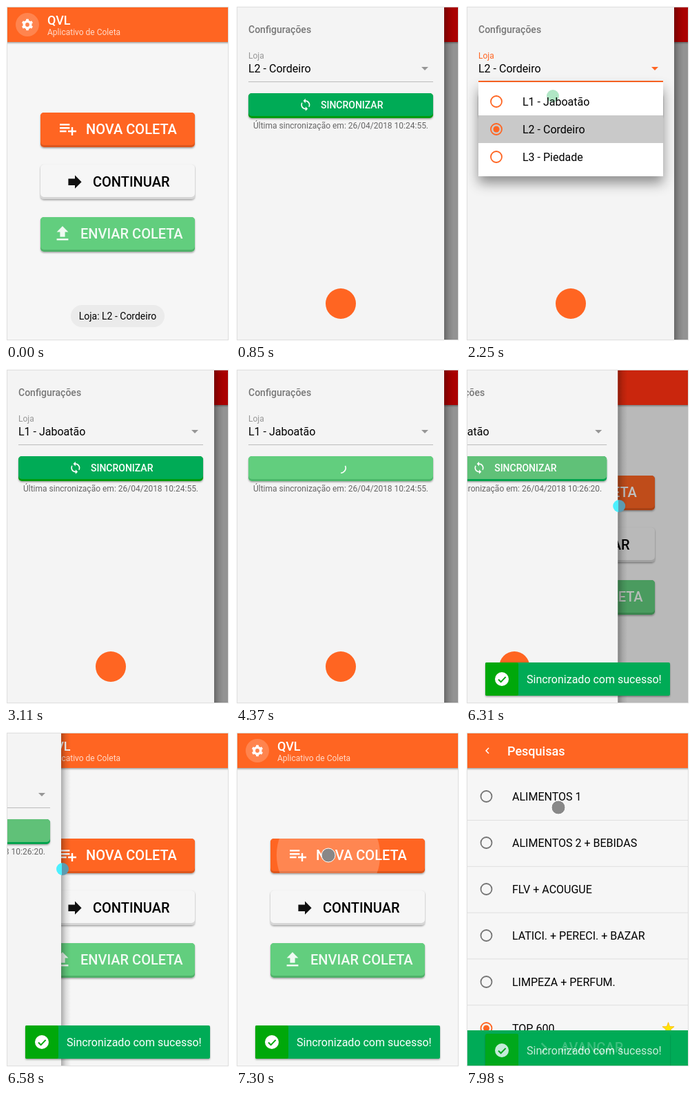
These frames come from a looping animation (325x484 px, 8000 ms). An HTML page:

```html
<!DOCTYPE html>
<html lang="pt">
<head>
<meta charset="utf-8">
<title>Aplicativo de Coleta</title>
<style>
html, body { margin: 0; width: 325px; height: 484px; overflow: hidden; background: #fff; }
svg { display: block; font-family: Roboto, sans-serif; }
.m { font-weight: 500; }
.s12 { font-size: 12px; }
.s14 { font-size: 14px; }
.s16 { font-size: 16px; }
.s20 { font-size: 20px; }
</style>
</head>
<body>
<svg id="stage" width="325" height="484" viewBox="0 0 325 484">
  <defs>
    <clipPath id="screen"><rect x="2" y="2" width="320" height="480"/></clipPath>
    <clipPath id="syncClip"><rect x="18" y="126" width="268" height="36" rx="5"/></clipPath>
    <clipPath id="newClip"><rect x="50" y="154" width="224" height="50" rx="5"/></clipPath>
    <linearGradient id="edge">
      <stop offset="0" stop-opacity=".3"/><stop offset=".5" stop-opacity=".1"/><stop offset="1" stop-opacity="0"/>
    </linearGradient>
    <linearGradient id="split">
      <stop offset=".42" stop-color="#4cf0ff"/><stop offset=".42" stop-color="#5b9bb0"/>
    </linearGradient>
    <filter id="low" x="-10%" y="-20%" width="120%" height="150%">
      <feDropShadow dx="0" dy="1.5" stdDeviation="1.3" flood-opacity=".35"/>
    </filter>
    <filter id="high" x="-15%" y="-20%" width="130%" height="160%">
      <feDropShadow dx="0" dy="10" stdDeviation="9" flood-opacity=".42"/>
    </filter>
  </defs>
  <rect x="1.5" y="1.5" width="321" height="481" fill="#f6f6f6" stroke="#dedede"/>
  <g clip-path="url(#screen)">
    <g id="home">
      <g id="homeButtons"></g>
      <circle id="newRipple" cx="134" cy="178" fill="#fff" clip-path="url(#newClip)"/>
      <g fill="#fff">
        <path transform="translate(75.6 163) scale(1.2)" d="M14 10H2v2h12v-2zm0-4H2v2h12V6zm4 8v-4h-2v4h-4v2h4v4h2v-4h4v-2h-4zM2 16h8v-2H2v2z"/>
        <path transform="translate(85.6 239.8) scale(1.2)" fill="#111" d="M12 8V4l8 8-8 8v-4H4V8z"/>
        <path transform="translate(67.6 314.4) scale(1.2)" opacity=".9" d="M9 16h6v-6h4l-7-7-7 7h4zm-4 2h14v2H5z"/>
        <g class="m s20">
          <text x="116" y="185">NOVA COLETA</text>
          <text x="126" y="261" fill="#000">CONTINUAR</text>
          <text x="108" y="336" opacity=".92">ENVIAR COLETA</text>
        </g>
      </g>
      <rect x="94" y="432" width="136" height="32" rx="16" fill="#ebebeb"/>
      <text id="chip" class="s14" x="162" y="453" text-anchor="middle"></text>
    </g>
    <g id="list">
      <g id="rows"></g>
      <rect x="2" y="431" width="320" height="51" fill="#00ab57"/>
      <path transform="translate(97.5 441) scale(1.3)" fill="#fff" d="M8.6 7.4 10 6l6 6-6 6-1.4-1.4L13.2 12z"/>
      <text class="m s20" x="137" y="463" fill="#fff">AVANÇAR</text>
    </g>
    <rect id="dim" x="2" y="52" width="320" height="430"/>
    <rect id="bar" x="-4" y="-4" width="332" height="56" filter="url(#low)"/>
    <g id="homeTitle" fill="#fff">
      <circle cx="31" cy="27" r="17" opacity=".2"/>
      <g id="gear"><circle cx="31" cy="27" r="4.7" fill="none" stroke="#fff" stroke-width="3.6"/></g>
      <text class="m" font-size="18" x="60" y="27">QVL</text>
      <text class="s12" x="60" y="42" opacity=".75">Aplicativo de Coleta</text>
    </g>
    <g id="listTitle" fill="#fff">
      <path transform="translate(22 18) scale(.75)" d="M15.4 7.4 14 6l-6 6 6 6 1.4-1.4L10.8 12z"/>
      <text class="m" font-size="18" x="60" y="34">Pesquisas</text>
    </g>

    <g id="drawer">
      <rect x="302" y="2" width="14" height="480" fill="url(#edge)"/>
      <rect x="2" y="2" width="300" height="480" fill="#f4f4f4"/>
      <text class="m s14" x="18" y="39" fill="#777">Configurações</text>
      <text id="label" class="s12" x="18" y="76">Loja</text>
      <text id="store" class="s16" x="18" y="96"></text>
      <path id="caret" d="M269 88h10l-5 5z"/>
      <rect x="18" y="109" width="268" height="1" fill="#bcbcbc"/>
      <rect id="focus" y="108" height="2" fill="#ff6522"/>
      <g filter="url(#low)">
        <rect id="syncEdge" x="18" y="126" width="268" height="36" rx="5"/>
        <rect id="syncFace" x="18" y="126" width="268" height="33" rx="5"/>
      </g>
      <circle id="syncRipple" cx="150" cy="146" fill="#fff" clip-path="url(#syncClip)"/>
      <g id="syncText" fill="#fff">
        <path transform="translate(91 133) scale(.82)" d="M12 4V1L8 5l4 4V6c3.3 0 6 2.7 6 6 0 1-.25 2-.7 2.8l1.46 1.46C19.54 15 20 13.6 20 12c0-4.4-3.6-8-8-8zm0 14c-3.3 0-6-2.7-6-6 0-1 .25-2 .7-2.8L5.24 7.74C4.46 9 4 10.4 4 12c0 4.4 3.6 8 8 8v3l4-4-4-4v3z"/>
        <text class="m s14" x="123" y="148">SINCRONIZAR</text>
      </g>
      <circle id="spinner" cx="152" cy="143" r="7.2" fill="none" stroke="#fff" stroke-width="1.6"/>
      <text id="stamp" class="s12" x="152" y="177" text-anchor="middle" fill="#666"></text>
      <circle cx="152" cy="430" r="22" fill="#ff6522"/>
    </g>

    <g id="popover">
      <rect x="18" y="110" width="268" height="136" fill="#fff" filter="url(#high)"/>
      <rect x="18" y="158" width="268" height="40" fill="#c9c9c9"/>
      <g id="options"></g>
    </g>

    <g id="toast">
      <rect x="28" y="424" width="268" height="48" rx="2" fill="#00ab57" filter="url(#low)"/>
      <rect x="28" y="424" width="48" height="48" rx="2" fill="#00a80a"/>
      <circle cx="52" cy="448" r="10" fill="#fff"/>
      <path d="M47 448.5l3.6 3.6 7-7.2" fill="none" stroke="#00a80a" stroke-width="2"/>
      <text class="s16" x="88" y="454" fill="#fff">Sincronizado com sucesso!</text>
    </g>
    <circle id="pointer"/>
  </g>
</svg>
<script>
const $ = id => document.getElementById(id);
const set = (id, attrs) => { for (const k in attrs) $(id).setAttribute(k, attrs[k]); };
const show = (id, on) => set(id, { display: on ? 'inline' : 'none' });
const span = (t, a, b) => Math.min(1, Math.max(0, (t - a) / (b - a)));
const smooth = u => u * u * (3 - 2 * u);
const within = (t, a, b) => t >= a && t < b;
const mix = (a, b, u) => `rgb(${a.map((v, i) => Math.round(v + (b[i] - v) * u))})`;

const ORANGE = '#ff6522';
const LOOP = 8000;

const radio = (x, y, on, color) =>
  `<circle cx="${x}" cy="${y}" r="8" fill="none" stroke="${color}" stroke-width="1.8"/>` +
  (on ? `<circle cx="${x}" cy="${y}" r="4.5" fill="${color}"/>` : '');

const pushButton = (y, face, edge) =>
  `<g filter="url(#low)"><rect x="50" y="${y}" width="224" height="50" rx="5" fill="${edge}"/>` +
  `<rect x="50" y="${y}" width="224" height="47" rx="5" fill="${face}"/></g>`;

function build() {
  $('homeButtons').innerHTML = pushButton(154, ORANGE, '#dd571c') +
    pushButton(229, '#f6f6f6', '#d6d6d6') + pushButton(305, '#62ce7e', '#50b269');

  for (let a = 0; a < 360; a += 60)
    $('gear').innerHTML += `<rect x="29.1" y="18.8" width="3.8" height="4" rx=".6" transform="rotate(${a} 31 27)"/>`;

  $('options').innerHTML = ['L1 - Jaboatão', 'L2 - Cordeiro', 'L3 - Piedade'].map((name, i) => {
    const y = 138 + 40 * i;
    return radio(44, y, i === 1, ORANGE) + `<text class="s16" x="82" y="${y + 6}">${name}</text>`;
  }).join('');

  const groups = ['ALIMENTOS 1', 'ALIMENTOS 2 + BEBIDAS', 'FLV + ACOUGUE',
    'LATICI. + PERECI. + BAZAR', 'LIMPEZA + PERFUM.', 'TOP 600'];
  let rows = groups.map((name, i) => {
    const y = 93 + 67 * i, last = i === 5;
    return radio(29.5, y, last, last ? ORANGE : '#757575') +
      `<text class="s16" x="67" y="${y + 6}">${name}</text>` +
      `<rect x="2" y="${127 + 66.8 * i}" width="320" height="1" fill="#dfdfdf"/>`;
  }).join('');
  let star = '';
  for (let i = 0; i < 10; i++) {
    const r = i % 2 ? 3.6 : 9, a = i * Math.PI / 5;
    star += `${293.5 + r * Math.sin(a)},${428.5 - r * Math.cos(a)} `;
  }
  rows += `<polygon points="${star}" fill="#ffe600" stroke="#ffb400" stroke-width=".8"/>`;
  $('rows').innerHTML = rows;
}

// Right edge of the drawer, relative to the screen.
function drawerWidth(t) {
  if (t < 6100) return 300 * smooth(span(t, 560, 850));
  if (t < 6615) return 300 - 222 * smooth(span(t, 6130, 6570));
  return 78 * (1 - span(t, 6615, 6655));
}

function ripple(id, t, start, reach) {
  const u = span(t, start, start + 420);
  set(id, { r: reach * Math.sqrt(u), opacity: u > 0 ? 0.3 * (1 - u) : 0 });
}

function spin(t) {
  const u = ((t - 4025) / 1500) % 1, turn = 290 + (t - 4370) * 0.18;
  const grow = smooth(span(u, 0, 0.5)), shrink = smooth(span(u, 0.5, 1));
  const from = 100 * grow + 255 * shrink;
  const len = Math.max(2, Math.min(3 + 252 * grow, 360 - from)) * 7.2 * Math.PI / 180;
  set('spinner', { 'stroke-dasharray': `${len} 99`, transform: `rotate(${turn + from} 152 143)` });
}

function touch(t) {
  let x = 126, y = 92, r = 9, opacity = 0, fill = '#b0e6c5', blend = 'multiply', ring = 'none';
  if (within(t, 1720, 2430)) {
    y += 38 * smooth(span(t, 1930, 2180));
    opacity = 1 - span(t, 2330, 2430);
  } else if (within(t, 3200, 3500)) {
    x = 150; y = 146;
    opacity = 1 - span(t, 3400, 3500);
  } else if (within(t, 5990, 6800)) {
    const fade = span(t, 6640, 6800);
    x = t < 6615 ? 2 + drawerWidth(t) + 2 : 82;
    y = 198;
    r = 9 + 4 * fade;
    opacity = 1 - fade;
    fill = 'url(#split)';
    blend = 'normal';
  } else if (within(t, 7130, 7420) || t >= 7700) {
    x = 134; y = t < 7500 ? 178 : 109;
    opacity = t < 7500 ? 1 - span(t, 7300, 7420) : 1;
    fill = '#888';
    ring = '#fff';
    blend = 'normal';
    r = 10;
  }
  set('pointer', { cx: x, cy: y, r, opacity, fill, stroke: ring, style: `mix-blend-mode:${blend}` });
}

function render(t) {
  const onList = t >= 7480;
  show('home', !onList);
  show('homeTitle', !onList);
  show('list', onList);
  show('listTitle', onList);

  const width = drawerWidth(t), shade = span(width, 80, 300);
  show('drawer', width > 0);
  set('drawer', { transform: `translate(${width - 300} 0)` });
  set('dim', { opacity: 0.4 * shade });
  set('bar', { fill: mix([255, 101, 34], [170, 0, 0], shade) });
  set('homeTitle', { opacity: 1 - 0.4 * shade });

  const name = t < 2440 ? 'L2 - Cordeiro' : 'L1 - Jaboatão';
  $('store').textContent = name;
  $('chip').textContent = 'Loja: ' + name;
  const focus = smooth(span(t, 1760, 1960)) * (1 - span(t, 2570, 2750));
  set('label', { fill: mix([150, 150, 150], [255, 101, 34], focus) });
  set('caret', { fill: mix([150, 150, 150], [255, 101, 34], focus) });
  set('focus', { x: 152 - 134 * focus, width: 268 * focus });

  const open = smooth(span(t, 1830, 2030)), zoom = 0.7 + 0.3 * open;
  show('popover', open > 0 && t < 2440);
  set('popover', { opacity: open, transform: `translate(18 110) scale(${zoom}) translate(-18 -110)` });

  const busy = within(t, 3520, 5560);
  show('syncText', !busy);
  show('spinner', busy);
  spin(t);
  set('syncFace', { fill: t < 3520 ? '#00ab57' : busy ? '#62ce7e' : '#60c178' });
  set('syncEdge', { fill: t < 3520 ? '#009a0f' : busy ? '#4cb86a' : '#00a34e' });
  ripple('syncRipple', t, 3300, 150);
  ripple('newRipple', t, 7180, 140);
  $('stamp').textContent = `Última sincronização em: 26/04/2018 ${t < 5560 ? '10:24:55' : '10:26:20'}.`;

  const up = t < 7000 ? smooth(span(t, 5670, 5910)) : 1 - 0.23 * span(t, 7920, 7980);
  show('toast', up > 0);
  set('toast', { opacity: up, transform: `translate(0 ${52 * (1 - up)})` });

  touch(t);
}

build();
const begin = performance.now();
function tick() {
  render((performance.now() - begin) % LOOP);
  requestAnimationFrame(tick);
}
tick();
</script>
</body>
</html>
```
